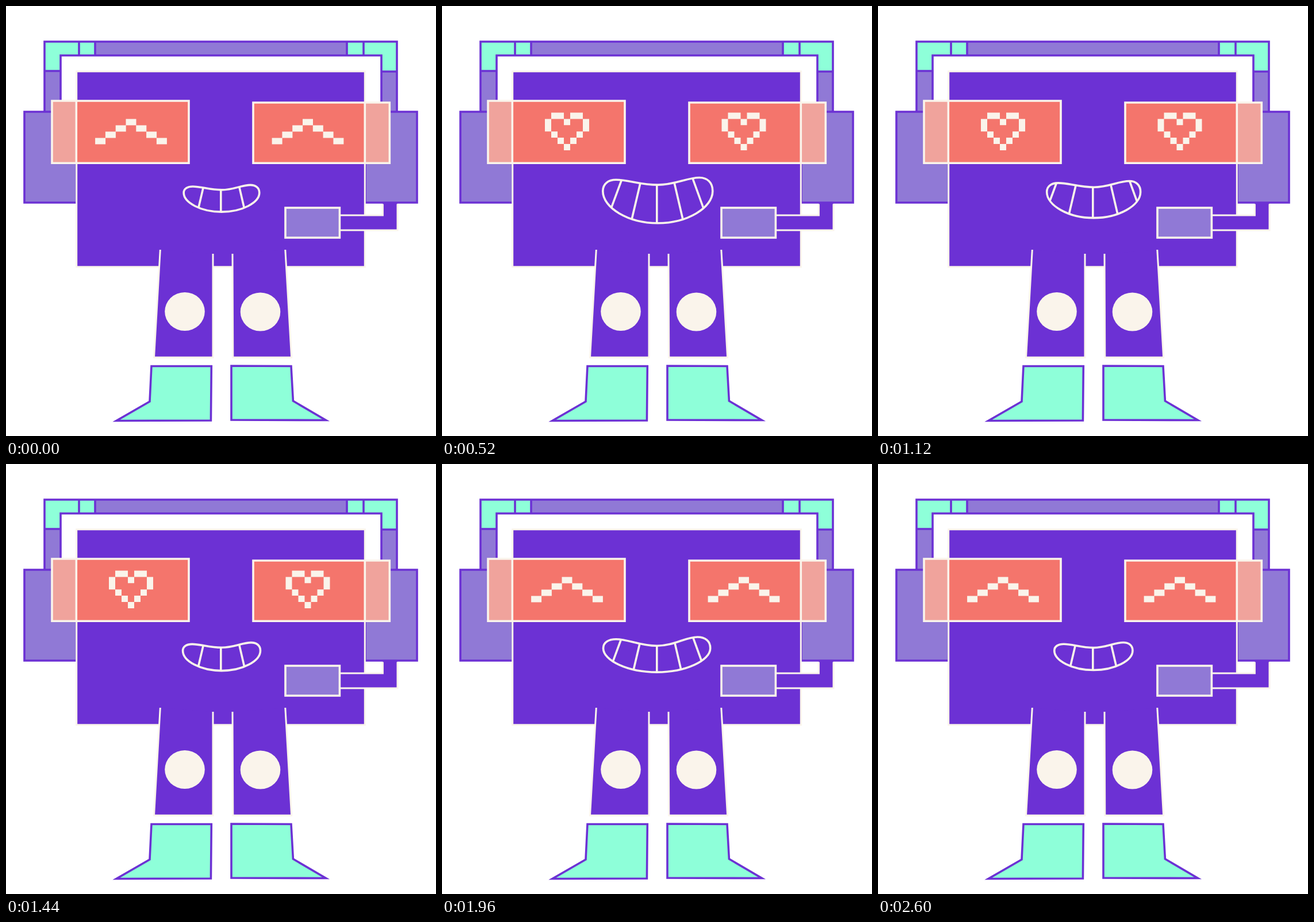
Write an HTML page that moves like this. It is 748 by 748 pixels and loops after 2.64 s.

```html
<!DOCTYPE html>
<html lang="en">
<head>
<meta charset="utf-8">
<title>Robot with headset</title>
<style>
  html, body { margin: 0; width: 100%; height: 100%; overflow: hidden; background: #fff; }
  svg { display: block; width: 100%; height: 100%; }
  .p { fill: #6c31d4; }
  .l { fill: #9079d6; }
  .m { fill: #8effd9; }
  .c { fill: #faf4eb; }
  .r { fill: #f4756c; }
  .w { fill: #f0a39c; }
  .n { fill: none; }
  .sp, .sc { stroke-width: 3.6; stroke-miterlimit: 10; }
  .sp { stroke: #6c31d4; }
  .sc { stroke: #faf4eb; }
  .thin { stroke-width: 3; }
</style>
</head>
<body>
<svg viewBox="0 0 748 748">
  <defs><clipPath id="clip"><path id="clipPath"/></clipPath></defs>

  <!-- headband -->
  <path class="l" d="M67 184V62H680V184H653V86H95V184Z"/>
  <path class="m" d="M67 113V62H155V86H95V113ZM593 62H680V114H653V86H593Z"/>
  <path class="n sp" d="M67 184V62H680V184M95 184V86H653V184M127 62V86M155 62V86M593 62V86M622 62V86M67 113H95M653 114H680"/>

  <!-- ear cups -->
  <path class="l sp" d="M32 184H123V342H32ZM625 184H715V342H625Z"/>

  <!-- head -->
  <rect class="p sc thin" x="122.7" y="113.8" width="501.6" height="340"/>

  <!-- legs -->
  <path class="p sc thin" d="M268.3 424L257.5 611.2H360V431M394 431L394.8 611.2H496.6L485.8 424"/>
  <ellipse class="c" cx="311" cy="531.5" rx="34.8" ry="33.5"/>
  <ellipse class="c" cx="442.5" cy="532" rx="34.8" ry="33.5"/>

  <!-- boots -->
  <path class="m sp" d="M253 626.5H357.3L356.4 721L192 721.5L250 688Z"/>
  <path class="m sp" d="M392 626L496 626.5L499.4 687L556.4 720.5L392 720Z"/>

  <!-- microphone -->
  <path class="p" d="M580 364H655.5V341H680.5V389.5H580Z"/>
  <path class="n sc thin" d="M580 364H655.4V344.5M580 390H681V344.5"/>
  <rect class="l sc" x="486" y="351" width="94.4" height="52"/>

  <!-- lenses -->
  <path class="w" d="M80 165H123V273.3H80ZM624 168H667V273.3H624Z"/>
  <path class="r" d="M122.5 165H318V273.3H122.5ZM430 168H624.5V273.3H430Z"/>
  <path class="n sc" d="M80 165H318V273.3H80ZM122.3 165V273M430 168H667.3V273.3H430ZM624.3 168V273"/>
  <path id="eyes" class="c"/>

  <!-- mouth -->
  <path class="n sc" clip-path="url(#clip)" d="M316 293L289 366M348.8 292L328 380M373.8 290V390M400.5 292L421 380M433.5 293L460 366"/>
  <path id="mouth" class="n sc"/>
</svg>
<script>
const LOOP = 2640;
const get = id => document.getElementById(id);
const mix = (a, b, k) => a + (b - a) * k;

function ease(t, from, to) {
  const x = Math.min(1, Math.max(0, (t - from) / (to - from)));
  return x * x * (3 - 2 * x);
}

// Mouth poses: centre x, half width, then the heights of corner, lobe, dip and bottom.
const small = [375, 65, 325, 313, 320, 358];
const deep = [375.3, 96, 322, 300.2, 311, 378];
const wide = [373.5, 95.5, 320, 302, 316, 362.5];

// Bezier points of one half, from the dip round to the bottom.
function halfMouth([cx, w, corner, lobe, dip, bottom], side) {
  const x = f => cx + side * w * f;
  const top = lobe - side * w * 0.02;
  return [
    [cx, dip], [x(0.32), dip], [x(0.53), top],
    [x(0.76), top], [x(0.9), top], [x(1), mix(corner, top, 0.65)],
    [x(1), corner], [x(1), mix(corner, bottom, 0.52)], [x(0.54), bottom],
    [cx, bottom]
  ];
}

function mouthPath(pose) {
  const right = halfMouth(pose, 1);
  const left = halfMouth(pose, -1).reverse();
  const [first, ...rest] = [...right, ...left.slice(1)];
  return `M${first}C${rest.join(' ')}Z`;
}

function mouthPose(t) {
  const u = t < 40 ? t + LOOP : t;
  const first = u < 1600;
  const open = first ? deep : wide;
  const k = first
    ? ease(u, 40, 560) - ease(u, 680, 1600)
    : ease(u, 1600, 2036) - ease(u, 2280, 2680);
  return small.map((v, i) => mix(v, open[i], k));
}

const block = (x, y, w, h) => `M${x} ${y}h${w}v${h}h${-w}z`;
const onBothEyes = draw => draw(217.5) + draw(525);

const caret = onBothEyes(cx => {
  let d = '';
  for (let i = -3; i <= 3; i++)
    d += block(cx - 9 + i * 17.8, 196.5 + Math.abs(i) * 11, 18, 11);
  return d;
});

const heartRows = ['.XX.XX.', 'X..X..X', 'X.....X', '.X...X.', '..X.X..', '...X...'];
const heart = onBothEyes(cx => heartRows.map((row, y) =>
  [...row].map((cell, x) => cell === 'X'
    ? block(cx - 38.5 + x * 11, 185.5 + y * 10.9, 11, 10.9) : '').join('')).join(''));

function render(t) {
  const d = mouthPath(mouthPose(t));
  get('mouth').setAttribute('d', d);
  get('clipPath').setAttribute('d', d);
  get('eyes').setAttribute('d', t >= 240 && t < 1560 ? heart : caret);
}

const start = performance.now();
function tick(now) {
  render(Math.max(0, now - start) % LOOP);
  requestAnimationFrame(tick);
}
render(0);
requestAnimationFrame(tick);
</script>
</body>
</html>
```
